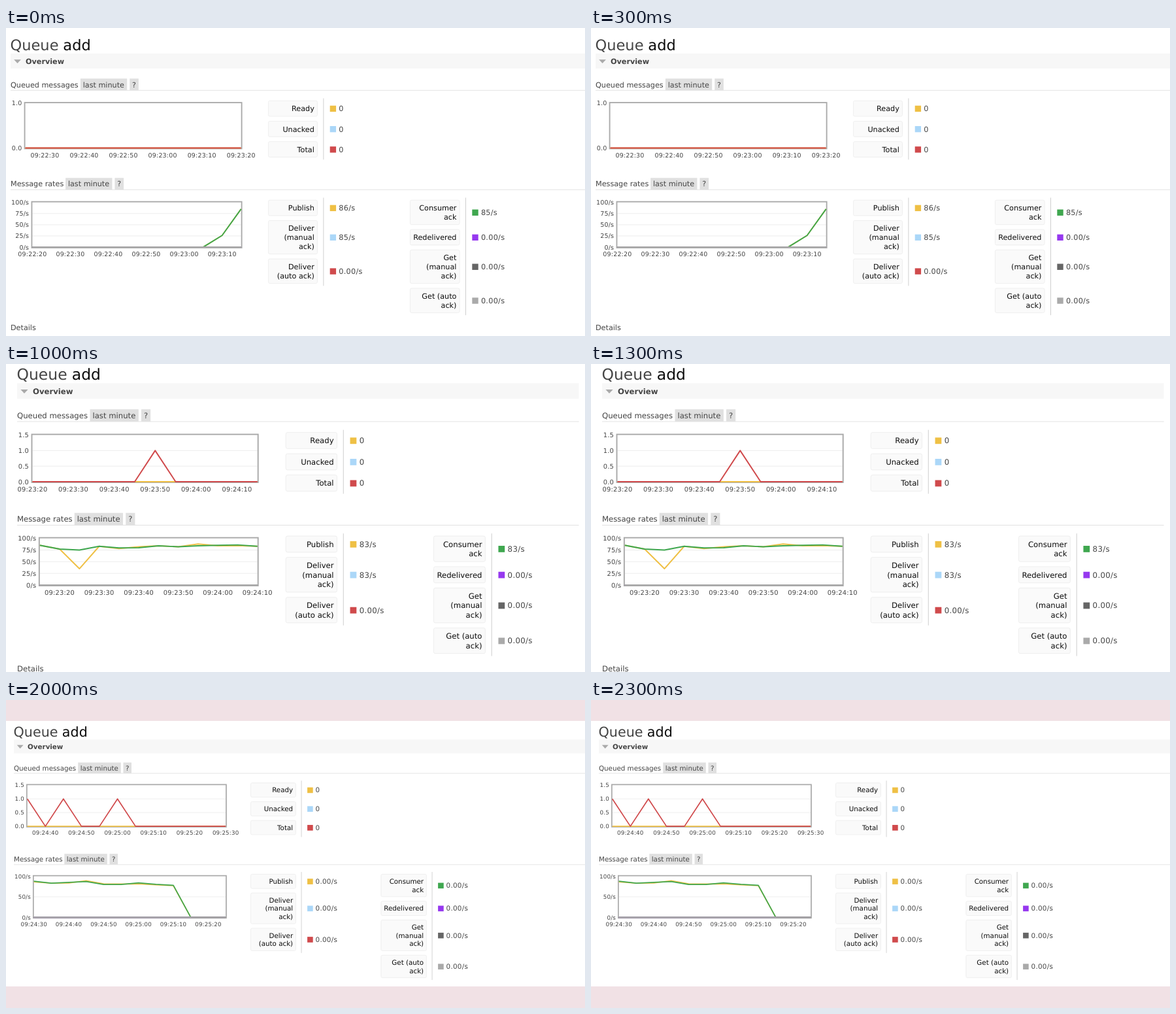
Write an HTML page that moves like this. It is 886 px wide and 471 px high and loops after 2.5 s.

```html
<!DOCTYPE html>
<html lang="en">
<head>
<meta charset="utf-8">
<title>Queue overview</title>
<style>
  html, body { margin: 0; width: 100%; height: 100%; overflow: hidden; background: #fff; }
  svg { display: block; width: 886px; height: 471px; }
  text { font: 11.95px "DejaVu Sans", Verdana, sans-serif; fill: #444; white-space: pre; text-rendering: geometricPrecision; }
  .title { font-size: 24px; }
  .bold { font-weight: bold; }
  .tick { font-size: 10.1px; letter-spacing: .2px; }
  .value { font-size: 12px; letter-spacing: .3px; }
  .dark { fill: #0c0c0c; }
  .end { text-anchor: end; }
  .mid { text-anchor: middle; }
  .scene { visibility: hidden; animation: show 2500ms step-end infinite; }
  @keyframes show {
    0% { visibility: visible; }
    20%, 100% { visibility: hidden; }
  }
</style>
</head>
<body>
<svg id="stage" viewBox="0 0 886 471"></svg>
<script>
const YELLOW = '#efc045', BLUE = '#abd7f8', RED = '#d04a4c', GREEN = '#3fa74f',
      PURPLE = '#9638ef', DARK = '#666', GRAY = '#aaa';
const SPAN = 55, STEP = 5;

// Times are seconds after 09:22:00; rate samples begin at FIRST.
const FIRST = 65;
const acked = [0, 26, 85, 77, 75, 83, 79.5, 80, 84, 82, 84, 85, 86, 83, 79,
               81, 81, 88, 83, 85, 87, 80, 80, 84, 80.5, 78];
const published = [0, 26, 85, 77, 35, 83, 78, 82, 84, 82, 88, 84, 84.5, 83, 79,
                   81.5, 84, 86.5, 83, 83.5, 89, 81.5, 81, 81.5, 79, 77];
const busy = [110, 150, 155, 165, 180];

const sample = list => t => list[(t - FIRST) / STEP] ?? 0;
const zero = () => 0;
const total = t => busy.includes(t) ? 1 : 0;

const scenes = [
  { scale: .938, x: 7,  y: 11.85, start: 25,  queued: [0, 0, 0], rates: [86, 85, 85], top: 1,   unit: 25 },
  { scale: .958, x: 7,  y: 2.3,   start: 40,  queued: [0, 0, 0], rates: [83, 83, 83], top: 1,   unit: 25 },
  { scale: .978, x: 17, y: 1,     start: 80,  queued: [0, 0, 0], rates: [83, 83, 83], top: 1.5, unit: 25, width: 879 },
  { scale: 1,    x: 8,  y: 0,     start: 120, queued: [0, 1, 1], rates: [81, 80, 80], top: 1.5, unit: 50 },
  { scale: .862, x: 12, y: 35.4,  start: 155, queued: [0, 0, 0], rates: [0, 0, 0],    top: 1.5, unit: 50, bands: true },
];

const rect = (x, y, w, h, fill, extra = '') =>
  `<rect x="${x}" y="${y}" width="${w}" height="${h}" fill="${fill}" ${extra}/>`;
const line = (x1, y1, x2, y2, color) =>
  `<path d="M${x1} ${y1}L${x2} ${y2}" stroke="${color}"/>`;
// y is the middle of the capitals
const text = (x, y, str, cls = '') =>
  `<text x="${x}" y="${y + (cls.includes('tick') ? 3.7 : 4.4)}" class="${cls}">${str}</text>`;

const clock = t => `09:${22 + Math.floor(t / 60)}:${String(t % 60).padStart(2, '0')}`;
const rate = n => n ? `${n}/s` : '0.00/s';

function heading(y, title, x, width) {
  return line(8, y + 9.5, 8 + width, y + 9.5, '#e2e2e2')
    + text(8, y, title)
    + rect(x, y - 9.7, 76, 19, '#e0e0e0') + text(x + 4, y, 'last minute')
    + rect(x + 80.3, y - 9.7, 14.5, 19, '#e0e0e0') + text(x + 87.5, y, '?', 'mid');
}

function chart({ x, y, start, max, unit, label, series }) {
  const w = 384 - x, h = 73;
  const px = t => x + (t - start) / SPAN * w;
  const py = v => y + h - v / max * h;
  let out = '';
  for (let v = 0; v <= max; v += unit) {
    if (v > 0 && v < max) out += line(x, py(v), 384, py(v), '#ececec');
    out += text(x - 5.5, py(v), label(v), 'tick end');
  }
  // the border lies outside the plot area
  out += rect(x - 1, y - 1, w + 2, h + 2, 'none', `stroke="${GRAY}" stroke-width="2"`);
  for (let t = Math.ceil(start / 10) * 10; t <= start + SPAN; t += 10)
    out += text(px(t), y + 84.6, clock(t), 'tick mid');
  for (const [color, value] of series) {
    let d = '';
    for (let t = start; t <= start + SPAN; t += STEP)
      d += `${d ? 'L' : 'M'}${px(t).toFixed(2)} ${py(value(t)).toFixed(2)}`;
    out += `<path d="${d}" fill="none" stroke="${color}" stroke-width="2" stroke-linejoin="round"/>`;
  }
  return out;
}

function legend(x, y, w, rows) {
  const right = x + w;
  let out = '', top = y;
  for (const [label, color, value] of rows) {
    const words = label.split('|');
    const h = 10.7 + 14.6 * words.length, mid = top + h / 2;
    out += rect(x, top, w, h, '#fafafa', 'stroke="#eee" rx="2.5"');
    words.forEach((word, i) => {
      out += text(right - 5, mid + (i - (words.length - 1) / 2) * 14.6, word, 'dark end');
    });
    out += rect(right + 20.5, mid - 4.7, 10, 10, color) + text(right + 35, mid, value, 'value');
    top += h + 8;
  }
  return line(right + 10, y - 4, right + 10, top - 4, '#ccc') + out;
}

function scene(s, i) {
  const { start, width = 1100, queued, rates } = s;
  const body =
    `<text x="7.5" y="23.7" class="title">Queue</text><text x="93.7" y="23.7" class="title dark">add</text>`
    + rect(8, 29, width, 24.5, '#f7f7f7')
    + `<path d="M13.5 38.8H25L19.2 45Z" fill="${GRAY}"/>`
    + text(32.5, 41.5, 'Overview', 'bold')

    + heading(79.5, 'Queued messages', 122, width)
    + chart({
        x: 32, y: 110, start, max: s.top, unit: s.top > 1 ? .5 : 1,
        label: v => v.toFixed(1),
        series: [[YELLOW, zero], [RED, total]],
      })
    + legend(428.5, 106, 80, [
        ['Ready', YELLOW, queued[0]],
        ['Unacked', BLUE, queued[1]],
        ['Total', RED, queued[2]],
      ])

    + heading(241.5, 'Message rates', 97.7, width)
    + chart({
        x: 43.6, y: 271.6, start: start - STEP, max: 100, unit: s.unit,
        label: v => `${v}/s`,
        series: [[YELLOW, sample(published)], [GREEN, sample(acked)],
                 [PURPLE, zero], [DARK, zero], [GRAY, zero], [GRAY, zero]],
      })
    + legend(428.5, 268, 80, [
        ['Publish', YELLOW, rate(rates[0])],
        ['Deliver|(manual|ack)', BLUE, rate(rates[1])],
        ['Deliver|(auto ack)', RED, rate(0)],
      ])
    + legend(659.8, 268, 80.7, [
        ['Consumer|ack', GREEN, rate(rates[2])],
        ['Redelivered', PURPLE, rate(0)],
        ['Get|(manual|ack)', DARK, rate(0)],
        ['Get (auto|ack)', GRAY, rate(0)],
      ])
    + text(8, 475.5, 'Details');

  const bands = s.bands ? rect(0, 0, 886, 32, '#f1e1e5') + rect(0, 438, 886, 33, '#f1e1e5') : '';
  return `<g class="scene" style="animation-delay:${i * 500 - 2500}ms">`
    + `<g transform="translate(${s.x - 8 * s.scale} ${s.y}) scale(${s.scale})">${body}</g>${bands}</g>`;
}

document.getElementById('stage').innerHTML = scenes.map(scene).join('');
</script>
</body>
</html>
```
